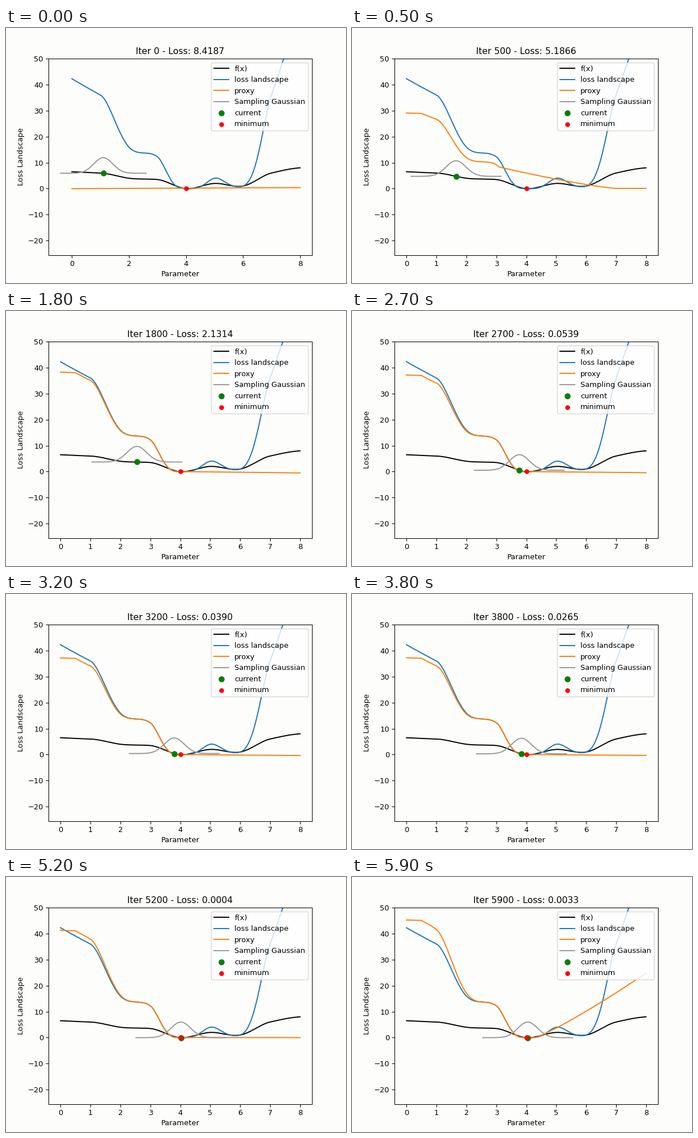
These frames come from a looping animation (600x450 px, 6 s). A matplotlib script:

```python
import numpy as np
import matplotlib.pyplot as plt
from matplotlib.animation import FuncAnimation

FRAMES, INTERVAL = 60, 100
PAPER = "#fdfefc"

# Heights of f at x = -2 ... 10; the outer two on each side only set end slopes
HEIGHTS = np.array([7.5, 7, 6.5, 6, 4, 3.5, 0, 2, 1, 6, 8, 8.5, 8.5])

# Optimiser state at a few key steps
KEYS = [0, 10, 18, 27, 38, 52, 59]
PARAM = [1.1, 2.21, 2.55, 3.77, 3.84, 4.02, 4.05]
LOSS = [8.4187, 3.1954, 2.1314, 0.0539, 0.0265, 0.0004, 0.0033]
LIFT = [-0.5, -0.5, -1, -2.1, -2, 2, 6]


def f(x):
    """Akima curve through HEIGHTS on 0..8."""
    d = np.diff(HEIGHTS)
    w = np.abs(np.diff(d))
    left, right = w[2:], w[:-2]
    m = (left * d[1:-2] + right * d[2:-1]) / (left + right)
    y = HEIGHTS[2:-2]
    i = np.clip(np.floor(x).astype(int), 0, 7)
    t = x - i
    return ((1 + 2 * t) * (1 - t) ** 2 * y[i] + t * (1 - t) ** 2 * m[i]
            + t * t * (3 - 2 * t) * y[i + 1] + t * t * (t - 1) * m[i + 1])


def landscape(x):
    return f(x) ** 2


def ramp(x, start, end):
    return np.clip((x - start) / (end - start), 0, 1)


def proxy(step, x):
    """Learned curve: follows the landscape up to a joint, then a plain tail."""
    joint = np.interp(step, [10, 18], [3.1, 3.88])
    sag = np.interp(step, [10, 18, 38, 52], [0, -0.5, -0.3, 0])
    rise = np.interp(step, [52, 59], [0, 24.8])
    fade = ramp(x, 2.5, 0.7)
    lift = np.interp(step, KEYS, LIFT) * fade * fade * (3 - 2 * fade)
    head = landscape(x) + lift - 3 * ramp(x, 0.5, 0)
    tail = (landscape(joint) * ramp(x, 7, joint) ** 1.25
            + sag * ramp(x, 4, 8) + rise * ramp(x, 4.3, 8) ** 1.15)
    learned = 1 - (1 - ramp(step, 0, 10)) ** 2
    return (1 - learned) * 0.05 * x + learned * np.where(x < joint, head, tail)


x = np.linspace(0, 8, 401)
spread = np.linspace(-1.5, 1.5, 121)
bell = 6 * np.exp(-0.5 * (spread / 0.33) ** 2)

fig, ax = plt.subplots(figsize=(6.4, 4.8), dpi=93.75, facecolor=PAPER)
ax.set_facecolor(PAPER)
ax.plot(x, f(x), color="black", label="f(x)")
ax.plot(x, landscape(x), color="C0", label="loss landscape")
proxy_line, = ax.plot([], [], color="C1", label="proxy")
bell_line, = ax.plot([], [], color="#999999", label="Sampling Gaussian")
current = ax.scatter([1.1], [6], s=50, color="green", zorder=3, label="current")
ax.scatter([4], [0], s=30, color="red", zorder=3, label="minimum")
ax.set_ylim(-25.5, 50)
ax.set_xlabel("Parameter")
ax.set_ylabel("Loss Landscape")
ax.legend(loc="upper right")
title = ax.set_title("")


def draw(step):
    p = np.interp(step, KEYS, PARAM)
    loss = np.exp(np.interp(step, KEYS, np.log(LOSS)))
    proxy_line.set_data(x, proxy(step, x))
    bell_line.set_data(p + spread, f(p) + bell)
    current.set_offsets([[p, f(p)]])
    low = min(0, p - 1.5)
    pad = 0.05 * (8 - low)
    ax.set_xlim(low - pad, 8 + pad)
    title.set_text(f"Iter {100 * step} - Loss: {loss:.4f}")
    return proxy_line, bell_line, current, title


anim = FuncAnimation(fig, draw, frames=FRAMES, interval=INTERVAL,
                     repeat=True, repeat_delay=0, blit=False)
plt.show()
```
